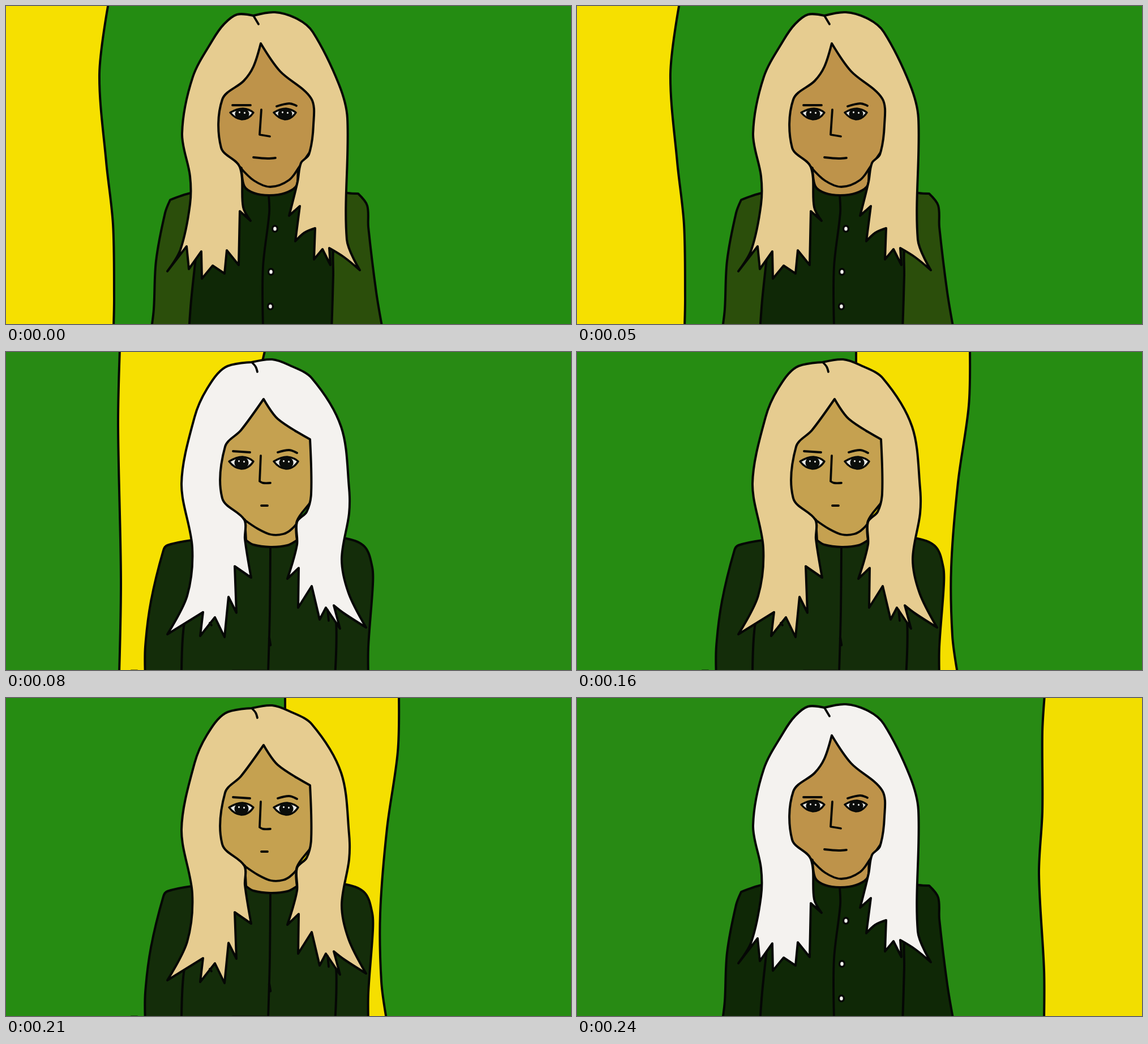
Write an HTML page that moves like this. It is 998 by 561 pixels and loops after 0.32 s.

```html
<!DOCTYPE html>
<html lang="en">
<head>
<meta charset="utf-8">
<title>Portrait</title>
<style>
  html, body { margin: 0; width: 100%; height: 100%; overflow: hidden; }
  svg { display: block; width: 100%; height: 100%; }
</style>
</head>
<body>
<svg id="stage" viewBox="0 0 998 561" preserveAspectRatio="none"></svg>
<script>
const INK = '#050705', BLOND = '#e6cc90', WHITE = '#f4f2ef', STEP = 80;

const parse = s => s.trim().split(/\s+/).map(p => p.split(',').map(Number));
const unit = (a, b) => {
  const x = b[0] - a[0], y = b[1] - a[1], l = Math.hypot(x, y) || 1;
  return [x / l, y / l];
};

// Smooth pen line through the points; sharp turns stay sharp.
function curve(text) {
  const p = parse(text), n = p.length;
  const tangent = p.map((q, i) => {
    if (!i || i === n - 1) return [0, 0];
    const a = unit(p[i - 1], q), b = unit(q, p[i + 1]);
    return a[0] * b[0] + a[1] * b[1] < 0.65 ? [0, 0] : unit(p[i - 1], p[i + 1]);
  });
  let d = 'M' + p[0];
  for (let i = 1; i < n; i++) {
    const a = p[i - 1], b = p[i], s = tangent[i - 1], e = tangent[i];
    const k = Math.hypot(b[0] - a[0], b[1] - a[1]) * 0.32;
    d += `C${a[0] + s[0] * k},${a[1] + s[1] * k} ${b[0] - e[0] * k},${b[1] - e[1] * k} ${b}`;
  }
  return d;
}

const path = (d, fill, width) => `<path d="${d}" fill="${fill}" stroke="${width ? INK : 'none'}" ` +
  `stroke-width="${width}" stroke-linecap="round" stroke-linejoin="round"/>`;
const area = (pts, fill, width = 4) => path(curve(pts) + 'Z', fill, width);
const line = (pts, width = 3.8) => path(curve(pts), 'none', width);
const oval = (x, y, rx, ry, fill, width = 0) => `<ellipse cx="${x}" cy="${y}" rx="${rx}" ry="${ry}" ` +
  `fill="${fill}" stroke="${INK}" stroke-width="${width}"/>`;
const button = (x, y) => oval(x, y, 4.5, 5.3, WHITE, 3.4);

function eye(left, right, y, h) {
  const m = (left + right) / 2, top = y - h, low = y + h, side = y - 2.5;
  const lids = `M${left},${side}Q${m - 8},${top} ${m + 2},${top}Q${right - 7},${top + 1} ${right},${side}` +
    `Q${right - 8},${low} ${m},${low}Q${left + 9},${low - 1} ${left},${side}Z`;
  return path(lids, '#e9e9e4', 3.4) + oval(m + 0.5, y, 12.5, h, '#0b0d0b') +
    oval(m - 4, y - 3, 1.5, 1.8, '#e9e9e4') + oval(m + 5, y - 2, 1.5, 1.8, '#e9e9e4');
}

function buttoned(hair, sleeve) {
  const shirt = '#0f2806', skin = '#be934a';
  const crown = '437,17 475,11 515,23 542,46 588,138 603,198 602,412 625,466 ';
  const rightTips = '597,443 571,427 573,457 559,429 544,447 546,392 527,400 511,415 519,353 500,370 515,310 ';
  const face = '521,277 535,262 543,210 539,163 484,115 450,66 437,107 420,132 382,165 380,250 413,284 419,355 ';
  const leftTips = '432,379 413,362 411,457 390,431 386,472 365,458 346,481 345,433 323,464 319,424 285,468 ';
  const back = '308,430 325,350 325,300 311,225 330,125 365,60 385,32 408,15 437,17';
  return area('256,575 261,535 265,450 281,365 290,342 326,330 421,315 514,315 604,330 622,331 ' +
      '638,352 640,390 654,505 666,575', sleeve) +
    area('323,575 327,520 336,434 345,330 421,315 514,315 590,330 578,430 578,475 575,575', shirt) +
    line('464,334 465,365 454,460 454,565') +
    area('416,286 421,318 438,330 465,334 493,330 513,317 517,288 545,240 548,150 452,50 375,160 370,255', skin) +
    line('413,284 438,308 467,319 500,307 520,281 535,262') +
    area(crown + rightTips + face + leftTips + back, hair) +
    line('437,17 446,32') + line('400,175 432,175') + line('478,177 500,172 513,176') +
    line('451,183 448,227 466,230') + line('437,267 462,269 476,268') +
    eye(396, 437, 190.5, 9.5) + eye(473, 512, 190.5, 9.5) +
    button(475, 393) + button(468, 469) + button(467, 530);
}

function plain(hair) {
  const shirt = '#142d0a', skin = '#c5a150';
  const crown = '434,18 470,13 500,23 540,46 592,132 606,240 606,285 593,365 605,425 636,486 ';
  const rightTips = '597,461 579,447 590,488 565,451 554,472 540,413 516,451 517,381 497,400 514,340 ';
  const face = '514,300 531,282 539,250 537,154 480,118 455,83 415,138 387,167 382,258 421,296 422,330 433,398 ';
  const leftTips = '404,378 407,460 393,432 386,503 369,468 343,501 348,459 285,498 ';
  const back = '320,430 329,345 310,232 333,115 355,65 387,27 434,18';
  return area('246,575 246,520 256,440 278,350 285,341 328,332 424,322 514,322 601,329 634,344 ' +
      '647,380 648,410 640,520 640,575', shirt) +
    area('310,575 315,478 340,400 424,322 514,322 570,400 583,473 581,575', shirt) +
    line('467,344 466,460 463,565') + line('465,505 467,517', 4.5) +
    area('422,296 424,332 437,340 467,344 497,341 514,332 514,298 545,250 545,150 455,65 378,165 375,260', skin) +
    line('421,296 445,312 468,322 490,321 505,312 531,282') +
    area(crown + rightTips + face + leftTips + back, hair) +
    line('434,18 441,26 444,35') + line('401,175 431,177') + line('480,177 500,173 514,178') +
    line('450,183 448,228 454,231 467,231') + line('451,271 462,271') +
    eye(394, 437, 195.5, 10.5) + eye(473, 516, 195.5, 10.5) +
    line('360,478 363,482') + line('568,455 570,474') +
    line('221,562 232,562', 3) + line('400,562 460,562', 3);
}

function backdrop(green, yellow, left, right) {
  const reversed = parse(right).reverse().join(' ');
  return `<rect width="998" height="561" fill="${green}"/>` +
    area(left + ' ' + reversed, yellow, 0) + line(left, 4) + line(right, 4);
}

const poses = [
  backdrop('#248c12', '#f6e000', '-9,-9 -9,570',
    '181,-5 165,120 177,275 189,385 191,515 190,566') + buttoned(BLOND, '#2b4e0b'),
  backdrop('#288a14', '#f6e000', '201,-5 198,130 203,400 200,566',
    '458,-5 450,40 450,566') + plain(WHITE),
  backdrop('#268c12', '#f5df00', '493,-5 493,566',
    '694,-5 692,95 673,230 661,380 663,500 672,566') + plain(BLOND),
  backdrop('#288a14', '#f2de00', '826,-5 822,60 822,200 816,310 825,480 825,566',
    '1007,-9 1007,570') + buttoned(WHITE, '#0f2806')
];

const stage = document.getElementById('stage');
stage.innerHTML = poses.map(p => `<g>${p}</g>`).join('');
const layers = [...stage.children];

function render(ms) {
  const shown = Math.floor(Math.max(0, ms) / STEP) % layers.length;
  layers.forEach((g, i) => g.setAttribute('display', i === shown ? 'inline' : 'none'));
}

const start = performance.now();
function tick() {
  render(performance.now() - start);
  requestAnimationFrame(tick);
}
render(0);
requestAnimationFrame(tick);
</script>
</body>
</html>
```
